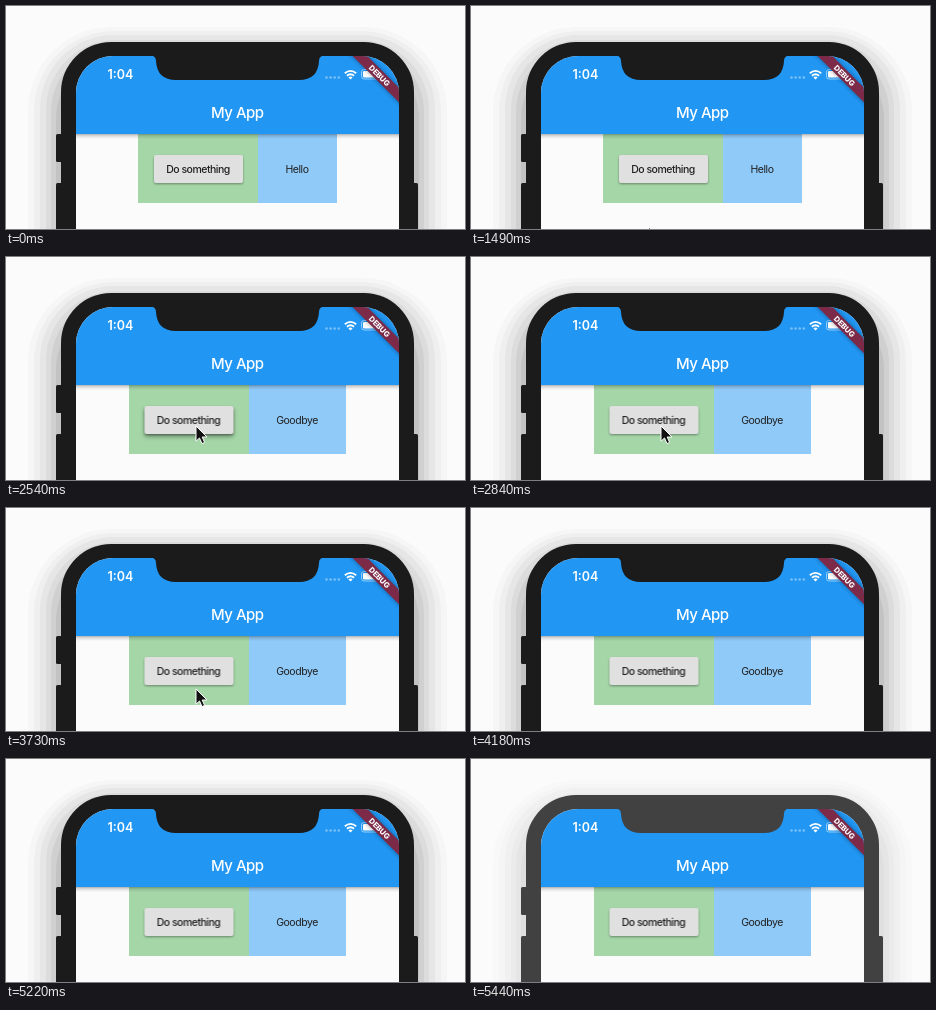
An HTML page that plays this animation: 459x223 px, repeating every 5.54 s.

```html
<!DOCTYPE html>
<html lang="en">
<head>
<meta charset="utf-8">
<title>My App</title>
<style>
html, body { margin: 0; width: 100%; height: 100%; overflow: hidden; }
body { background: #fbfbfb; }
svg { display: block; width: 459px; height: 223px; }
text { font-family: Inter, "Noto Sans", sans-serif; text-anchor: middle; }
.label { font-size: 10.5px; font-weight: 500; letter-spacing: -.5px; fill: #202020; }
.reply { font-weight: 400; letter-spacing: -.45px; }
.backdrop, .soft, .hard, .case, .cursor, .before, .after, .button, .actions, .page, .lift, .bold {
  animation: 5540ms step-end infinite;
}

.backdrop { fill: #fbfbfb; animation-name: dim; }
.page { fill: #fbfbfb; animation-name: dim; }
.soft { animation-name: soft; }
.hard { opacity: 0; animation-name: hover; }
.case { fill: #1b1b1b; animation-name: case; }
.before { animation-name: before; }
.after { opacity: 0; animation-name: after; }
.actions { animation-name: shift; }
.button { fill: #e0e0e0; animation-name: button; }
.lift { opacity: 0; animation-name: lift; }
.bold { animation-name: bold; }
.cursor { opacity: 0; animation-name: cursor; }

@keyframes dim { 35.018% { fill: #f7f7f7; } 43.14% { fill: #fbfbfb; } }
@keyframes soft {
  0% { opacity: 1; }
  35.018% { opacity: 0; }
  43.14% { opacity: 1; }
  98.194% { opacity: .5; }
}
@keyframes hover { 35.018% { opacity: 1; } 43.14% { opacity: 0; } }
@keyframes case { 98.194% { fill: #414141; } }
@keyframes before { 45.848% { opacity: 0; } 100% { opacity: 0; } }
@keyframes after { 45.848% { opacity: 1; } 100% { opacity: 1; } }
@keyframes shift {
  45.848% { transform: translateX(-9.5px); }
  100% { transform: translateX(-9.5px); }
}
@keyframes button { 35.018% { fill: #f7f7f7; } 43.14% { fill: #e0e0e0; } }
@keyframes lift { 35.018% { opacity: 1; } 51.263% { opacity: 0; } }
@keyframes bold { 35.018% { font-weight: 600; } 43.14% { font-weight: 500; } }
@keyframes cursor {
  26.895% { opacity: 1; transform: translate(178px, 221px); }
  29.602% { opacity: 1; transform: translate(181px, 207px); }
  32.31% { opacity: 1; transform: translate(187px, 185px); }
  35.018% { opacity: 1; transform: translate(190px, 169px); }
  67.328% { opacity: 1; transform: translate(190px, 181px); }
  70.036% { opacity: 1; transform: translate(185px, 199px); }
  72.743% { opacity: 1; transform: translate(181px, 215px); }
  75.451% { opacity: 0; }
}
</style>
</head>
<body>
<svg viewBox="0 0 459 223">
  <defs>
    <clipPath id="screen"><rect x="70" y="50" width="323" height="250" rx="37"/></clipPath>
    <linearGradient id="barShadow" x2="0" y2="1">
      <stop stop-opacity=".3"/><stop offset=".35" stop-opacity=".13"/><stop offset="1" stop-opacity="0"/>
    </linearGradient>
    <filter id="blur1" x="-20%" y="-40%" width="140%" height="200%"><feGaussianBlur stdDeviation="1"/></filter>
    <filter id="blur2" x="-20%" y="-40%" width="140%" height="200%"><feGaussianBlur stdDeviation="2"/></filter>
  </defs>

  <rect class="backdrop" width="459" height="223"/>

  <g class="soft">
    <rect x="22" y="21" width="419" height="360" rx="84" fill="#f6f6f6"/>
    <rect x="28" y="25" width="407" height="360" rx="80" fill="#efefef"/>
    <rect x="34" y="29" width="395" height="360" rx="74" fill="#e6e6e6"/>
    <rect x="40" y="34" width="383" height="360" rx="70" fill="#dcdcdc"/>
    <rect x="45" y="40" width="373" height="360" rx="66" fill="#d0d0d0"/>
    <rect x="50" y="50" width="363" height="360" rx="62" fill="#c3c3c3"/>
  </g>
  <g class="hard">
    <rect x="36" y="35" width="391" height="360" rx="72" fill="#d2d2d2"/>
    <rect x="44" y="42" width="375" height="360" rx="66" fill="#bdbdbd"/>
  </g>

  <g class="case">
    <rect x="50" y="128" width="8" height="28" rx="1.5"/>
    <rect x="50" y="177" width="8" height="60" rx="1.5"/>
    <rect x="405" y="177" width="7" height="80" rx="1.5"/>
    <rect x="55" y="36" width="353" height="300" rx="50"/>
  </g>

  <g clip-path="url(#screen)">
    <rect class="page" x="70" y="50" width="323" height="180"/>

    <g class="before">
      <rect x="132" y="128" width="120" height="69" fill="#a5d6a7"/>
      <rect x="252" y="128" width="79" height="69" fill="#90caf9"/>
      <text class="label reply" x="291" y="166.5">Hello</text>
    </g>
    <g class="after">
      <rect x="123" y="128" width="120" height="69" fill="#a5d6a7"/>
      <rect x="243" y="128" width="97" height="69" fill="#90caf9"/>
      <text class="label reply" x="291" y="166.5">Goodbye</text>
    </g>

    <g class="actions">
      <rect class="lift" x="148" y="152" width="89" height="28" rx="2" fill="#000" fill-opacity=".3" filter="url(#blur2)"/>
      <rect x="148" y="150.5" width="89" height="27.5" rx="2" fill="#000" fill-opacity=".38" filter="url(#blur1)"/>
      <rect class="button" x="148" y="149" width="89" height="28" rx="2"/>
      <text class="label bold" x="192" y="166.5">Do something</text>
    </g>

    <rect x="70" y="128" width="323" height="5" fill="url(#barShadow)"/>
    <rect x="70" y="50" width="323" height="78" fill="#2196f3"/>
    <text x="231.3" y="112.3" font-size="15" font-weight="500" letter-spacing="-.5" fill="#fff">My App</text>

    <g fill="#fff">
      <text x="114.5" y="73" font-size="12.5" font-weight="600">1:04</text>
      <g opacity=".4">
        <circle cx="320.5" cy="71.5" r="1.3"/><circle cx="324.6" cy="71.5" r="1.3"/>
        <circle cx="328.7" cy="71.5" r="1.3"/><circle cx="332.8" cy="71.5" r="1.3"/>
      </g>
      <g fill="none" stroke="#fff" stroke-width="1.8">
        <path d="M338.8 67.3Q344.5 62.5 350.2 67.3"/>
        <path d="M340.9 69.8Q344.5 66.7 348.1 69.8"/>
      </g>
      <path d="M342.4 71.4Q344.5 69.8 346.6 71.4L344.5 73.6Z"/>
      <rect x="355.5" y="63.5" width="18" height="9.5" rx="2.5" fill="none" stroke="#fff" stroke-opacity=".5"/>
      <rect x="357" y="65" width="15" height="6.5" rx="1.3"/>
    </g>

    <g transform="translate(373.5 69.5) rotate(45)">
      <rect x="-40" y="-5.2" width="80" height="10.4" fill="#000" fill-opacity=".4" filter="url(#blur2)"/>
      <rect x="-40" y="-5.2" width="80" height="10.4" fill="#7c2a48"/>
      <text y="2.8" font-size="7.6" font-weight="800" letter-spacing="-.1" fill="#fff">DEBUG</text>
    </g>
  </g>

  <path class="case" d="M145 49.5Q150 50 150 55Q151 74 170 74H293Q312 74 313 55Q313 50 318 49.5Z"/>

  <path class="cursor" d="M0 0V15.2L3.5 12L6 17.6L8.6 16.4L6.2 11H11Z" fill="#111" stroke="#fff" stroke-width="1" stroke-linejoin="round"/>
</svg>
</body>
</html>
```
